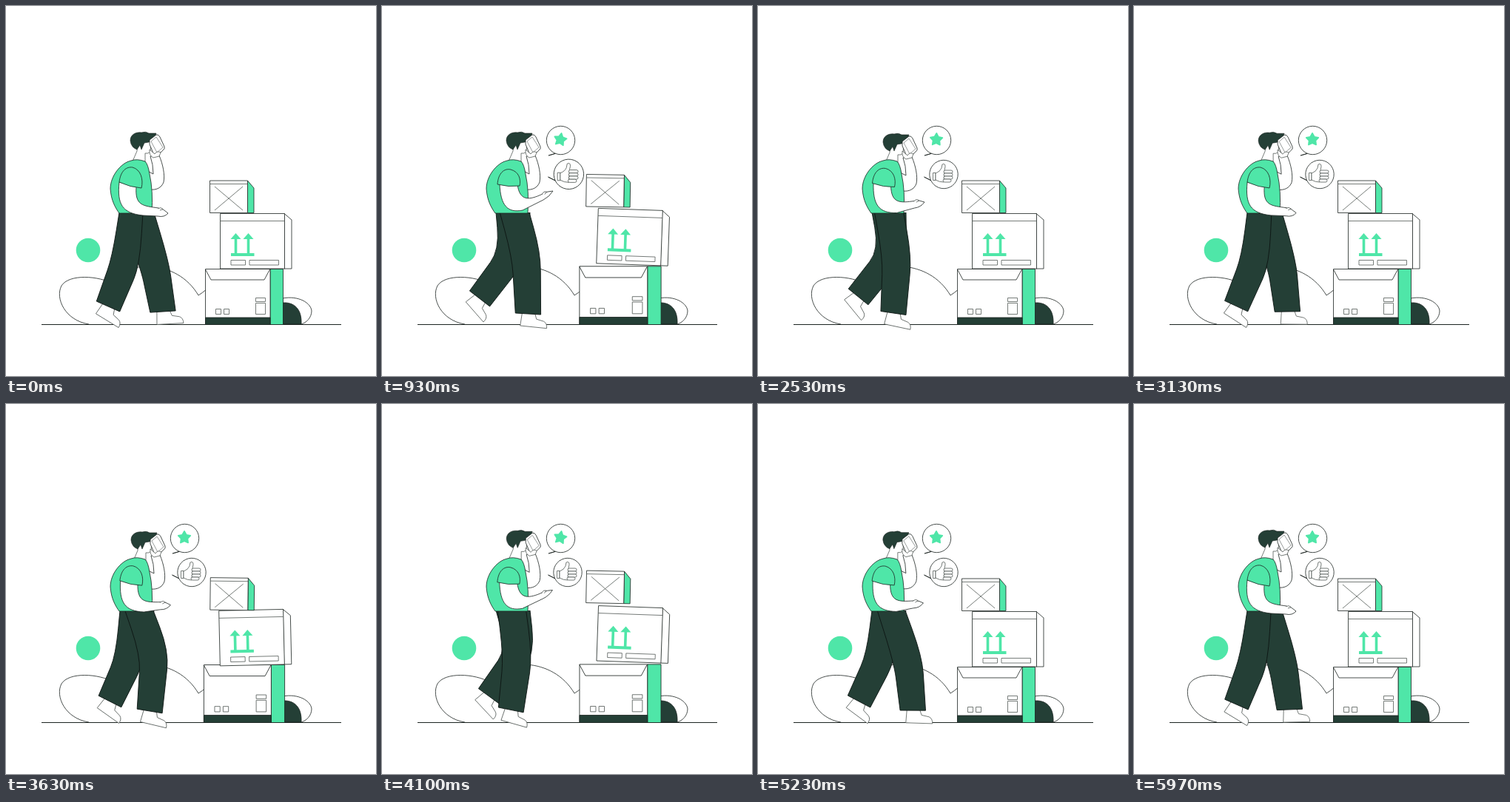
Write an HTML page with a canvas that moves like this. It is 500 by 500 pixels and loops after 6000 ms.

```html
<!DOCTYPE html>
<html lang="en">
<head>
<meta charset="utf-8">
<title>Courier on the phone</title>
<style>
html, body { margin: 0; width: 100%; height: 100%; overflow: hidden; background: #fff; }
canvas { display: block; width: 500px; height: 500px; }
</style>
</head>
<body>
<canvas id="stage" width="500" height="500"></canvas>
<script>
const ctx = document.getElementById('stage').getContext('2d');
const GREEN = '#4fe6a8', DARK = '#243f36', INK = '#1c2421', GREY = '#555c59', WHITE = '#fff';
const LOOP = 6000, STEP = 1500, BEAT = 3000;

// Key rows: [phase, values...]; legs give knee x, y and hem x, y.
const NEAR = [
  [0, 162, 345, 138, 406], [.05, 162, 345, 138, 406], [.18, 177, 337, 140, 404],
  [.3, 195, 333, 166, 409], [.42, 201, 337, 194, 415], [.5, 203, 347, 210, 414],
  [.62, 195, 336, 197.5, 416], [.687, 188, 340, 183, 415], [.84, 174, 343, 157, 409]
];
const FAR = [
  [0, 201, 350, 212, 413], [.047, 201, 350, 211, 413], [.18, 193, 345, 191, 413],
  [.3, 178, 345, 165, 408], [.42, 167, 345, 140.5, 402], [.5, 165, 343, 136, 402],
  [.62, 177, 336, 132, 395.5], [.687, 182, 335, 135.5, 393], [.8, 195, 333, 163, 400],
  [.92, 201, 338, 195, 412]
];
// bottom scale, then lift, shift and tilt of the two upper boxes
const BOXES = [
  [0, 1, 0, 0, 0, 0, 0, 0], [.1, 1, 0, 0, 0, 0, 0, 0],
  [.21, 1.04, -2.2, -1, -1.3, -1, .5, .7], [.31, 1.05, -5.5, 1.5, 2, -8, .5, 1],
  [.523, 1.033, -7.5, 2, 2, -14, 1, 1.6], [.59, 1.01, -3.5, -.5, -1, -10, -.5, -2.5],
  [.75, 1, 0, 0, 0, 0, 0, 0], [.85, 1, 0, 0, 0, 0, 0, 0]
];
// forearm raise, head drop, star tilt
const GESTURE = [
  [0, 0, 0, 0], [.21, .28, 2, 0], [.31, 1, 0, 10], [.523, .5, 2, 9],
  [.59, .12, 1, -5], [.843, .5, 2, 2], [.99, 0, 0, 0]
];

// Periodic interpolation that never overshoots its keys.
function track(keys, p) {
  const n = keys.length;
  const key = i => {
    const wrap = Math.floor(i / n);
    return { t: keys[i - wrap * n][0] + wrap, v: keys[i - wrap * n] };
  };
  let i = n - 1;
  while (keys[i][0] > p) i--;
  const [a, b, c, d] = [key(i - 1), key(i), key(i + 1), key(i + 2)];
  const h = c.t - b.t, u = (p - b.t) / h;
  return b.v.slice(1).map((v, j) => {
    const slope = (l, r) => (r.v[j + 1] - l.v[j + 1]) / (r.t - l.t);
    const tangent = (s, r) => s * r <= 0 ? 0 : 2 * s * r / (s + r);
    const s = slope(b, c), m0 = tangent(slope(a, b), s), m1 = tangent(s, slope(c, d));
    const e = u * u * (3 - 2 * u);
    return v + (c.v[j + 1] - v) * e + h * (m0 * u * (1 - u) * (1 - u) - m1 * u * u * (1 - u));
  });
}

const mix = (a, b, k) => a + (b - a) * k;
const mixPt = (a, b, k) => [mix(a[0], b[0], k), mix(a[1], b[1], k)];

function paint(d, fill, line = INK, width = .8) {
  const p = typeof d === 'string' ? new Path2D(d) : d;
  if (fill) { ctx.fillStyle = fill; ctx.fill(p); }
  if (line) { ctx.strokeStyle = line; ctx.lineWidth = width; ctx.stroke(p); }
}

function rect(x, y, w, h, fill, line = INK) {
  const p = new Path2D();
  p.rect(x, y, w, h);
  paint(p, fill, line);
}

function placed(x, y, angle, scale, draw) {
  ctx.save();
  ctx.translate(x, y);
  ctx.rotate(angle * Math.PI / 180);
  ctx.scale(scale, scale);
  draw();
  ctx.restore();
}

function scenery() {
  paint('M112 430C80 425 66 395 75 378C85 362 125 364 146 376M146 372C160 345 230 340 260 391Q265 388 272 382', null);
  paint('M374 395C395 391 412 401 413 412C413 421 406 428 399 430H374Z', WHITE);
  paint('M374 401C390 400 400 410 399 430H374Z', DARK);
  paint('M48 430.5H453', null, INK, 1);
  const dot = new Path2D();
  dot.arc(111, 330, 16.3, 0, 7);
  paint(dot, GREEN, null);
}

function bottomBox(s) {
  placed(322, 430.5, 0, s, () => {
    ctx.translate(-322, -430.5);
    rect(357, 355.5, 17.5, 75, GREEN);
    rect(269.5, 355.5, 87.5, 75, WHITE);
    rect(269.5, 421, 87.5, 9.5, DARK);
    paint('M269.5 356L277 370H349L356.5 356', null);
    rect(283.5, 409.5, 7, 7, null, GREY);
    rect(294.5, 409.5, 7, 7, null, GREY);
    rect(337.5, 394.5, 13, 5, null, GREY);
    rect(337.5, 401.5, 13, 15, null, GREY);
  });
}

function middleBox(lift, shift, tilt) {
  placed(337 + shift, 318 + lift, tilt, 1, () => {
    ctx.translate(-337, -318);
    paint('M376 280.5L386 289V355H376Z', WHITE);
    rect(289.5, 280.5, 87, 74.5, WHITE);
    paint('M289.5 290.5H376.5', null, GREY);
    rect(304, 334, 31.5, 4, GREEN, null);
    for (const x of [310.5, 327.5]) {
      rect(x - 1.8, 311, 3.6, 24, GREEN, null);
      paint(`M${x - 7} 315L${x} 307L${x + 7} 315Z`, GREEN, null);
    }
    rect(304, 343.5, 19.5, 6.5, null, GREY);
    rect(329, 343.5, 39.5, 6.5, null, GREY);
  });
}

function topBox(lift, shift, tilt) {
  placed(305 + shift, 258 + lift, tilt, 1, () => {
    ctx.translate(-305, -258);
    paint('M326.5 236L335 246V279.5H326.5Z', GREEN);
    rect(275.5, 236, 51, 43.5, WHITE);
    paint('M275.5 240.5H326.5M282 244L320 276M320 244L282 276', null, GREY);
  });
}

function leg([kx, ky, hx, hy], hipL, hipR) {
  const shin = Math.atan2(kx - hx, hy - ky), thigh = Math.atan2(177 - kx, ky - 282);
  const hem = .88 * shin + .087, bend = (shin + thigh) / 2;
  const edge = (x, y, a, r) => [x + r * Math.cos(a), y + r * Math.sin(a)];

  placed(hx, hy, hem * 72 + 1.5, 1, () =>
    paint('M-8 -2L-9 17H27Q27 10 22 8L12 6L9 -2Z', WHITE, GREY));

  const sides = [[hipL, -1], [hipR, 1]].map(([x, s]) =>
    [[x, 279], edge(kx, ky, bend, 19.5 * s), edge(hx, hy, hem, 17.2 * s)]);
  const [[a, b, c], [d, e, f]] = sides;
  const p = new Path2D();
  p.moveTo(...a);
  p.lineTo(...mixPt(a, b, .4));
  p.quadraticCurveTo(...b, ...mixPt(b, c, .3));
  p.lineTo(...c);
  p.lineTo(...f);
  p.lineTo(...mixPt(e, f, .3));
  p.quadraticCurveTo(...e, ...mixPt(d, e, .4));
  p.lineTo(...d);
  paint(p, DARK, '#0d1512', .9);
}

function headAndPhone(drop) {
  ctx.save();
  ctx.translate(drop * .5, drop);
  // raised far arm
  paint('M189 222L199 227Q199 214 195 203L207 202C212 214 215 228 213 238C210 246 203 249 194 248Z', WHITE);
  // neck and face
  paint('M171 210L177 196L178 182H196L195 197Q192 200 188 199L188 211Z', WHITE, GREY);
  // cap and hair
  paint('M168 182C168 174 175 170 183 171Q189 169 193 172L203 172Q201 180 193 184L187 185L183 194L181 188L177 194Q169 191 168 182Z', DARK, INK, .6);
  // phone
  paint('M194 181L203 174Q206 173 208 177L214 190Q215 193 212 195L205 202Q202 204 200 201L194 187Z', WHITE);
  paint('M196 183L203 177L212 191L204 198Z', null, GREY, .6);
  paint('M194 194Q193 202 199 205L207 203L209 198Q204 195 201 200Z', WHITE, GREY);
  ctx.restore();
}

function torso() {
  paint('M169 209C155 212 141 230 141 247C142 263 148 273 153 280H197Q199 250 194 227Q192 214 188 210Q177 206 169 209Z', GREEN);
}

// Arm and sleeve, lowered and raised; both hold the same run of curves.
const ARM = [
  'M153 238 C150 268 157 280 185 283 L205 284 Q214 286 219 280 Q213 274 206 273 C185 270 174 270 176 244Z',
  'M159 240 C160 270 170 280 190 276 L218 262 Q226 258 231 250 Q224 250 217 254 C200 262 186 265 183 241Z'
];
const SLEEVE = [
  'M153 238 C155 222 163 217 171 218 C182 221 186 234 183 246 Q168 245 153 238Z',
  'M156 241 C157 226 165 219 174 221 C185 224 188 234 186 243 Q171 245 156 241Z'
];
function blend([from, to], k) {
  const goal = to.match(/[\d.]+/g);
  let i = 0;
  return from.replace(/[\d.]+/g, v => mix(+v, +goal[i++], k).toFixed(2));
}

function nearArm(raise) {
  paint(blend(ARM, raise), WHITE);
  placed(mix(207, 219, raise), mix(276, 255, raise), mix(5, -27, raise), 1, () =>
    paint('M-2 -2Q2 -5 5 -2L1 0', WHITE, GREY));
  paint(blend(SLEEVE, raise), GREEN);
}

// Rises past full size and settles.
function pop(t, start) {
  const u = Math.min(1, Math.max(0, (t - start) / 500)) - 1;
  return 1 + 2.2 * u * u * u + 1.2 * u * u;
}

function bubble(tipX, tipY, scale, cx, cy, tail, icon) {
  if (scale <= 0) return;
  placed(tipX, tipY, 0, scale, () => {
    ctx.translate(-tipX, -tipY);
    const p = new Path2D();
    p.arc(cx, cy, 19.2, tail[0], tail[1]);
    p.lineTo(tipX, tipY);
    p.closePath();
    paint(p, WHITE);
    icon();
  });
}

function star(tilt) {
  placed(241, 180.5, tilt, 1, () => {
    const p = new Path2D();
    for (let i = 0; i < 10; i++) {
      const a = i * Math.PI / 5 - Math.PI / 2, r = i % 2 ? 4.6 : 8.6;
      p.lineTo(r * Math.cos(a), r * Math.sin(a));
    }
    p.closePath();
    ctx.lineJoin = 'round';
    paint(p, GREEN, GREEN, 1.8);
  });
}

function thumb() {
  rect(236.5, 225.5, 3.5, 10, WHITE, GREY);
  paint('M240 226Q246 224 248 219L249 214Q253 212 253 217L252 222L251 238Q245 238 240 235Z', WHITE, GREY);
  for (let i = 0; i < 4; i++) {
    const p = new Path2D();
    p.roundRect(251 - (i === 3 ? 1 : 0), 222 + i * 4, 12 - (i === 3 ? 1 : 0), 4, 2);
    paint(p, WHITE, GREY);
  }
}

function draw(t) {
  ctx.fillStyle = WHITE;
  ctx.fillRect(0, 0, 500, 500);
  ctx.lineJoin = 'round';

  const step = t % STEP / STEP, beat = t % BEAT / BEAT;
  const [size, midLift, midShift, midTilt, topLift, topShift, topTilt] = track(BOXES, beat);
  const [raise, drop, tilt] = track(GESTURE, beat);
  const near = track(NEAR, step);

  scenery();
  bottomBox(size);
  middleBox(midLift, midShift, midTilt);
  topBox(topLift, topShift, topTilt);

  leg(track(FAR, step), 154, 200);
  leg(near, 153 + Math.max(0, near[0] - 170) * .25, Math.min(199, 185 + (near[0] - 162) * .45));
  headAndPhone(drop);
  torso();
  nearArm(raise);

  bubble(225, 202, pop(t, 350), 241.5, 181.5, [1.95, 2.36 + 2 * Math.PI], () => star(tilt));
  bubble(224.5, 231, pop(t, 600), 251, 227.5, [2.7, 3.1 + 2 * Math.PI], thumb);
}

function frame() {
  draw(performance.now() % LOOP);
  requestAnimationFrame(frame);
}
frame();
</script>
</body>
</html>
```
